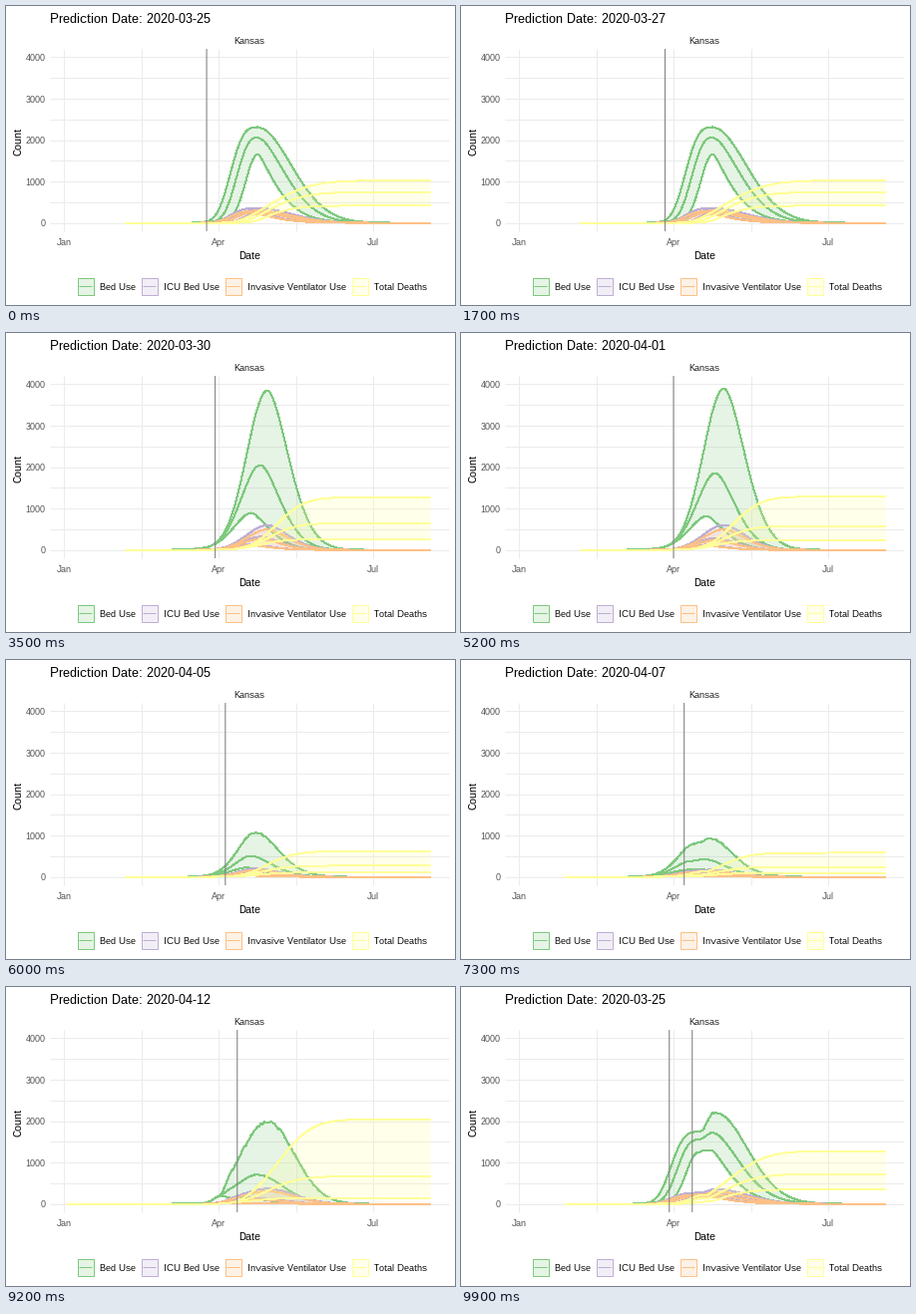
Animation of 450x300 px, one loop 10 s. Source, as a matplotlib script:

```python
import numpy as np
import matplotlib.pyplot as plt
from matplotlib.animation import FuncAnimation
from matplotlib.patches import Polygon, Rectangle

W, H, DPI = 450, 300, 100
PX = 72 / DPI                       # one pixel in points
LEFT, RIGHT, TOP, BOTTOM = 44, 444, 43, 226
STEP = 310 / 182                    # pixels per day
FIRST_DAY, LAST_DAY = 36, 216
GRID, GREY = "#EBEBEB", "#858585"

plt.rcParams.update({"font.family": "Liberation Sans",
                     "text.hinting": "native", "text.hinting_factor": 1})
fig = plt.figure(figsize=(W / DPI, H / DPI), dpi=DPI, facecolor="white")
ax = fig.add_axes([0, 0, 1, 1])
ax.set(xlim=(0, W), ylim=(H, 0))
ax.axis("off")

SERIES = {"Bed Use": "#7FC97F", "ICU Bed Use": "#BEAED4",
          "Invasive Ventilator Use": "#FDC086", "Total Deaths": "#FFFF99"}
COLORS = list(SERIES.values())


def gx(day):
    return 58 + STEP * day


def gy(count):
    return 217.6 - 0.04155 * count


def sig(z):
    return 1 / (1 + np.exp(-np.clip(z, -60, 60)))


def bell(x, c, wl, wr, pl, pr):
    """Two-sided bell: centre, half widths and steepness per side."""
    left, right = np.abs(x - c) / wl, np.abs(x - c) / wr
    return 0.5 ** np.where(x < c, left ** pl, right ** pr)


def forecast(high, mean, low, peak, wl=24, wr=24.5, pl=2, pr=1.75, lag=11,
             squeeze=0.1, care=0.155, rate=0.0107, foot=168, noise=0,
             known=0, start=FIRST_DAY):
    """Return x positions and counts[series, bound, row].

    Lower bounds peak earlier and are narrower; ICU beds and ventilators are
    shares of the beds, and deaths add up from them with a delay.
    """
    x = gx(np.arange(start, LAST_DAY + 1))
    rng = np.random.default_rng(int(high))
    beds = []
    for h in (high, mean, low):
        thin = (h / high) ** squeeze
        soft = thin ** 0.6
        c = peak - lag * np.log(high / h)
        y = h * bell(x, c, wl * thin, wr * thin, pl * soft, pr * soft)
        if known:                   # reported counts up to this place
            y = y * sig((x - known) / 2) + 170 * bell(x, 215, 8, 6, 2, 2)
        beds.append(y)
    beds = np.array(beds)
    deaths = rate * np.array([np.interp(x - 6 * STEP, x, np.cumsum(y)) for y in beds])
    beds[0] *= 1 + noise * rng.standard_normal(x.size)
    onset = 14 * sig(x - foot) * (x < peak - lag)
    return x, np.array([beds + onset, beds * care, beds * care * 0.82, deaths])


LATE = dict(care=0.185, noise=0.012)
MODELS = {
    "A": forecast(2300, 2050, 1650, 253, wl=28.5, wr=39, pl=3.2, pr=1.9,
                  lag=0, squeeze=2, foot=188),
    "B": forecast(3260, 1900, 1120, 265, wl=25, wr=26),
    "C": forecast(3850, 2050, 880, 262),
    "D": forecast(3875, 1950, 840, 263),
    "E": forecast(3900, 1850, 800, 263.5),
    "F": forecast(1080, 500, 210, 251, wl=21.5, wr=26, lag=6, rate=0.019,
                  foot=194, **LATE),
    "G": forecast(500, 180, 60, 248, lag=6, rate=0.03, start=2, **LATE),
    "H": forecast(2540, 740, 150, 264, wl=32, wr=30, pr=2, lag=8.5, rate=0.0175,
                  known=219, start=2, **LATE),
    "I": forecast(1980, 700, 150, 262, wl=31, wr=32, pr=2, lag=8.5, rate=0.027,
                  known=219, start=2, **LATE),
}
DAYS = [84, 85, 86, 88, 89, 90, 91, 95, 97, 98, 100, 102]
STATES = list(zip(DAYS, "AAABCDEFFGHI"))
STARTS = [5 + 8 * k + min(k, 4) for k in range(len(STATES))]


def date(day):
    return f"2020-03-{day - 59}" if day < 91 else f"2020-04-{day - 90:02d}"


def stretch(v, rows, at):
    """Repeat one row until the series has the wanted number of rows."""
    return np.insert(v, at, np.full(rows - v.size, v[at]))


def tween(a, b, t):
    """Yield series, bound and curve between two models, split at the peak."""
    (xa, ya), (xb, yb) = MODELS[a], MODELS[b]
    rows = max(xa.size, xb.size)
    short = ya if xa.size < xb.size else yb
    for s in range(4):
        for bound in range(3):
            at = short[0, bound].argmax()
            x0, x1, y0, y1 = (stretch(v, rows, at)
                              for v in (xa, xb, ya[s, bound], yb[s, bound]))
            yield s, bound, np.column_stack([x0 + (x1 - x0) * t,
                                             gy(y0 + (y1 - y0) * t)])


def label(x, y, s, size, color="black", ha="center", **kw):
    kw.setdefault("va", "baseline")
    return ax.text(x, y, s, fontsize=size * PX, color=color, ha=ha, **kw)


def rule(xs, ys, color, width=1.0, **kw):
    return ax.plot(xs, ys, color=color, lw=width * PX,
                   solid_capstyle="butt", **kw)[0]


# grid and axes
for n in range(0, 4001, 500):
    rule([LEFT, RIGHT], [gy(n)] * 2, GRID, zorder=1)
for day in np.arange(0, 183, 45.5):
    rule([gx(day) + 0.3] * 2, [TOP, BOTTOM], GRID, zorder=1)
for n in range(0, 4001, 1000):
    label(39.3, gy(n) + 3.6, str(n), 9, "#4D4D4D", "right")
for day, month in ((0, "Jan"), (91, "Apr"), (182, "Jul")):
    label(gx(day), 240, month, 9, "#4D4D4D")
label(244, 254, "Date", 11)
label(12, 136.5, "Count", 11, rotation=90, va="center")
label(243.5, 38.5, "Kansas", 9, "#1A1A1A")
title = label(43.5, 17, "", 13, ha="left")

# legend
for (name, color), x in zip(SERIES.items(), (72, 136, 220, 347)):
    box = (x - 0.5, 272.5), 16, 17
    ax.add_patch(Rectangle(*box, fc=color, alpha=0.2, lw=0))
    ax.add_patch(Rectangle(*box, fill=False, ec=color, lw=PX))
    rule([x + 1, x + 14], [280.6] * 2, color)
    label(x + 22, 284.6, name, 9, ha="left")

# moving parts
bands, lines = [], []
for i, color in enumerate(COLORS):
    bands.append(ax.add_patch(Polygon([[0, 0]], fc=color, alpha=0.2, lw=0,
                                      zorder=2 + i / 10)))
    lines.append([rule([], [], color, antialiased=False, zorder=2.05 + i / 10)
                  for _ in range(3)])
marker, leaving = (rule([], [], GREY, 1.1, zorder=4, snap=False) for _ in range(2))


def draw(f):
    k = sum(f >= s for s in STARTS)
    t = min((f - STARTS[k - 1] + 1) / 4, 1) if k else 1
    (day_a, a), (day_b, b) = STATES[max(k - 1, 0)], STATES[k % len(STATES)]
    title.set_text("Prediction Date: " + date(day_a if t <= 0.5 else day_b))

    curves = {}
    for s, bound, pts in tween(b if t == 1 else a, b, t):
        curves[s, bound] = pts
        lines[s][bound].set_data(*pts.T)
    for s, band in enumerate(bands):
        band.set_xy(np.vstack([curves[s, 0], curves[s, 2][::-1]]))

    marker.set_data([gx(day_a + (day_b - day_a) * t)] * 2, [TOP, BOTTOM])
    # the surplus marker of the last state stays until the loop closes
    leaving.set_data([gx(day_a)] * 2, [TOP, BOTTOM])
    leaving.set_visible(k == len(STATES))
    return [title, marker, leaving, *bands, *sum(lines, [])]


anim = FuncAnimation(fig, draw, frames=100, interval=100, repeat=True,
                     repeat_delay=0, init_func=lambda: draw(0), blit=False)
plt.show()
```
